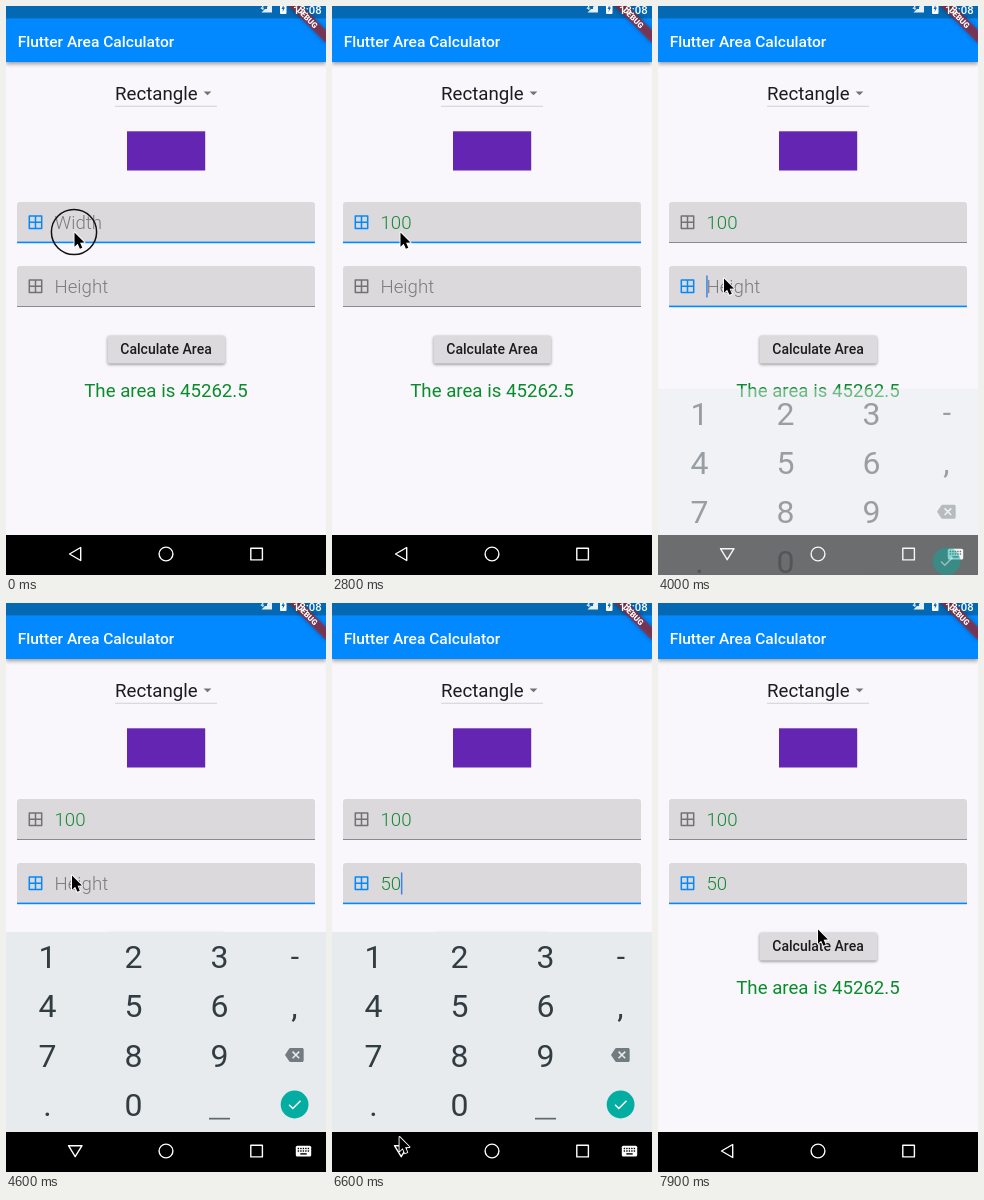
Recreate the animation shown at these times as an HTML page with a canvas. Size 320 by 569 pixels, loop 8 s.

```html
<!DOCTYPE html>
<html lang="en">
<head>
<meta charset="utf-8">
<title>Area Calculator</title>
<style>
  html, body { margin: 0; width: 100%; height: 100%; overflow: hidden; background: #000; }
  canvas { display: block; width: 320px; height: 569px; }
</style>
</head>
<body>
<canvas id="stage"></canvas>
<script>
const W = 320, H = 569, LOOP = 8000, DP = 7 / 9;
const BLUE = '#0389ff', GREY = '#737174', GREEN = '#158a35', KEY = '#313d42';
const canvas = document.getElementById('stage');
const dpr = window.devicePixelRatio || 1;
canvas.width = W * dpr;
canvas.height = H * dpr;
const c = canvas.getContext('2d');

const backspace = new Path2D('M22 3H7c-.69 0-1.23.35-1.59.88L0 12l5.41 8.11c.36.53.9.89 1.59.89h15c1.1 0 2-.9 2-2V5c0-1.1-.9-2-2-2zm-3 12.59L17.59 17 14 13.41 10.41 17 9 15.59 12.59 12 9 8.41 10.41 7 14 10.59 17.59 7 19 8.41 15.41 12 19 15.59z');

// Typed keys: [time, field text]; focus moves reset the caret too
const widthKeys = [[0, '100'], [0, ''], [1700, '1'], [2000, '10'], [2200, '100']];
const heightKeys = [[0, ''], [3700, ''], [5000, '5'], [5150, '50']];
const FOCUS = 3700;

// Pointer stops: [time, x, y]
const stops = [
  [0, 68.5, 226.5], [2900, 68.5, 226.5], [3400, 66, 272.5], [5450, 66, 272.5],
  [5780, 110.5, 303], [6000, 110.5, 303], [6700, 65, 547.5], [7250, 65, 547.5],
  [7850, 160, 326.5], [LOOP, 160, 326.5]
];
const clicks = [[0, 150], [3550, 3700], [7000, 7120]];

const clamp = v => Math.max(0, Math.min(1, v));
const smooth = v => v * v * (3 - 2 * v);
const last = (keys, t) => keys.filter(k => k[0] <= t).pop();

function rect(x, y, w, h, fill) {
  c.fillStyle = fill;
  c.fillRect(x, y, w, h);
}

function poly(points, fill) {
  c.beginPath();
  points.forEach(([x, y], i) => i ? c.lineTo(x, y) : c.moveTo(x, y));
  c.closePath();
  if (fill) {
    c.fillStyle = fill;
    c.fill();
  }
}

function round(x, y, w, h, r, fill) {
  c.beginPath();
  c.roundRect(x, y, w, h, r);
  c.fillStyle = fill;
  c.fill();
}

function text(s, x, y, size, fill, weight = 400, align = 'left') {
  c.font = `${weight} ${size}px Roboto, "Noto Sans", sans-serif`;
  c.textAlign = align;
  c.fillStyle = fill;
  c.fillText(s, x, y);
}

function shadow(color, blur, y) {
  c.shadowColor = color;
  c.shadowBlur = blur * dpr;
  c.shadowOffsetY = y * dpr;
}

function debugBanner() {
  c.save();
  c.translate(W, -6.7);
  c.rotate(Math.PI / 4);
  shadow('rgba(0,0,0,.5)', 5, 0);
  rect(-40 * DP, 28 * DP, 80 * DP, 12 * DP, 'rgba(183,28,28,.63)');
  shadow('transparent', 0, 0);
  text('DEBUG', 0, 37.5 * DP, 10.2 * DP, '#fff', 900, 'center');
  c.restore();
}

function statusBar() {
  poly([[266, -4], [266, 6.5], [255.5, 6.5]], 'rgba(255,255,255,.9)');
  rect(257, 0, 4, 3, '#0667b2');
  text('4', 254.5, 3.5, 6, '#fff', 700);
  round(274, -4, 6.5, 12, 1, '#fff');
  poly([[278, -2], [275.5, 3], [277, 3], [276.5, 6], [279, 1.5], [277.5, 1.5]], '#0667b2');
  text('13:08', 287, 7.5, 11.3, '#fff', 500);
}

function header() {
  c.save();
  shadow('rgba(0,0,0,.38)', 4, 2);
  rect(0, 0, W, 56, BLUE);
  c.restore();
  rect(0, 0, W, 12.4, '#0568b3');
  text('Flutter Area Calculator', 11.7, 40.7, 20 * DP, '#fff', 500);
}

function field(y, hint, keys, focused, t) {
  const [since, value] = last(keys, t);
  const tint = focused ? BLUE : GREY;
  round(11, y, 298, 41, [3, 3, 0, 0], '#dbd9dc');
  if (focused) rect(11, y + 39.6, 298, 1.6, BLUE);
  else rect(11, y + 40, 298, 0.9, '#848285');

  c.strokeStyle = tint;
  c.lineWidth = 1.5;
  c.strokeRect(23.3, y + 14, 12.4, 12.4);
  c.beginPath();
  c.moveTo(29.5, y + 14);
  c.lineTo(29.5, y + 26.4);
  c.moveTo(23.3, y + 20.2);
  c.lineTo(35.7, y + 20.2);
  c.stroke();

  text(value || hint, 48.5, y + 26.8, 24 * DP, value ? GREEN : '#7c7a7d', 300);
  if (focused && t >= 100 && Math.floor((t - since) / 500) % 2 === 0) {
    const x = 48.2 + (value ? c.measureText(value).width : 0);
    rect(x, y + 9.5, 1.5, 22, '#3f82e8');
  }
}

function page(t) {
  rect(0, 0, W, H, '#f9f7fb');
  header();
  text('Rectangle', 109, 93.6, 24 * DP, '#1c1b1d');
  poly([[197.6, 85.4], [205.4, 85.4], [201.5, 89.3]], '#747276');
  rect(109, 99.8, 102, 0.8, '#c9c7cb');
  rect(121, 125.3, 78.2, 39.2, '#6325b2');

  field(196, 'Width', widthKeys, t < FOCUS, t);
  field(260, 'Height', heightKeys, t >= FOCUS, t);

  c.save();
  shadow('rgba(0,0,0,.4)', 3, 1.2);
  round(101.5, 329.5, 117.5, 28, 2, '#dcdadd');
  c.restore();
  text('Calculate Area', 160, 348.2, 14, '#1c1b1d', 500, 'center');
  text('The area is 45262.5', 160, 391, 24 * DP, '#098d2c', 400, 'center');
  debugBanner();
  statusBar();
}

function navBar(t) {
  const typing = t >= 3850 && t < 7100;
  rect(0, 529, W, 40, '#000');

  const press = clamp((t - 7050) / 100) * (1 - clamp((t - 7250) / 250));
  if (press > 0) {
    const half = 20 + 19.5 * clamp((t - 7050) / 140);
    c.globalAlpha = press;
    round(69.5 - half, 529, half * 2, 40, 20, '#2b292b');
    c.globalAlpha = 1;
  }

  c.strokeStyle = '#fff';
  c.lineWidth = 1.4;
  c.lineJoin = 'round';
  if (typing) poly([[62.5, 542.7], [76, 542.7], [69.2, 553.7]]);
  else poly([[63.5, 548], [74.7, 541.5], [74.7, 554.5]]);
  c.stroke();
  c.beginPath();
  c.arc(160, 548, 6.9, 0, 7);
  c.stroke();
  c.strokeRect(244.8, 542.3, 11.6, 11.6);

  if (typing) {
    round(289.8, 542.8, 15.4, 10.6, 1.5, '#fff');
    for (let row = 0; row < 2; row++)
      for (let i = 0; i < 5; i++) rect(291.7 + i * 2.5, 544.8 + row * 2.5, 1.4, 1.4, '#000');
    rect(294.3, 550.2, 6.4, 1.4, '#000');
  }
}

function keyboard(t) {
  const enter = 1 - (1 - clamp((t - 3920) / 300)) ** 2;
  const p = enter * (1 - clamp((t - 7220) / 220) ** 2);
  if (p <= 0) return;
  c.save();
  c.globalAlpha = p;
  c.translate(0, 100 * (1 - p));
  rect(0, 329, W, 200, '#e7ebed');
  for (let n = 1; n < 10; n++) {
    const col = (n - 1) % 3, row = Math.floor((n - 1) / 3);
    text(n, 41.5 + col * 86, 364.8 + row * 49.4, 32, KEY, 400, 'center');
  }
  text('0', 127.5, 513.2, 32, KEY, 400, 'center');
  text('.', 41.5, 513.2, 32, KEY, 400, 'center');
  text('-', 289, 363.5, 30, KEY, 400, 'center');
  text(',', 288.5, 413.5, 32, KEY, 400, 'center');
  rect(203, 514.8, 21, 1.7, '#5f696d');

  c.save();
  c.translate(279, 442.6);
  c.scale(DP, DP);
  c.fillStyle = '#717b80';
  c.fill(backspace);
  c.restore();

  c.beginPath();
  c.arc(288.6, 501.5, 13.9, 0, 7);
  c.fillStyle = '#04ada2';
  c.fill();
  c.beginPath();
  c.moveTo(283, 501.8);
  c.lineTo(286.8, 505.5);
  c.lineTo(294.5, 497.8);
  c.strokeStyle = '#fff';
  c.lineWidth = 1.5;
  c.lineJoin = 'miter';
  c.stroke();
  c.restore();
}

function pointer(t) {
  const i = Math.max(1, stops.findIndex(s => s[0] > t));
  const [t0, x0, y0] = stops[i - 1], [t1, x1, y1] = stops[i];
  const k = smooth(clamp((t - t0) / (t1 - t0)));
  const x = x0 + (x1 - x0) * k, y = y0 + (y1 - y0) * k;

  if (clicks.some(([from, to]) => t >= from && t < to)) {
    c.beginPath();
    c.arc(x - 0.5, y - 0.5, 22.6, 0, 7);
    c.strokeStyle = '#111';
    c.lineWidth = 1.5;
    c.stroke();
  }

  c.save();
  c.translate(x, y);
  poly([[0, 0], [0, 14.2], [3.2, 11.2], [5.4, 16.3], [7.8, 15.3], [5.6, 10.3], [10, 10.1]]);
  c.strokeStyle = '#fff';
  c.lineWidth = 1.8;
  c.lineJoin = 'round';
  c.stroke();
  c.fillStyle = '#000';
  c.fill();
  c.restore();
}

function draw(t) {
  c.setTransform(dpr, 0, 0, dpr, 0, 0);
  page(t);
  navBar(t);
  keyboard(t);
  pointer(t);
}

let start = null;
function tick(now) {
  if (start === null) start = now;
  draw(Math.max(0, now - start) % LOOP);
  requestAnimationFrame(tick);
}
draw(0);
requestAnimationFrame(tick);
</script>
</body>
</html>
```
